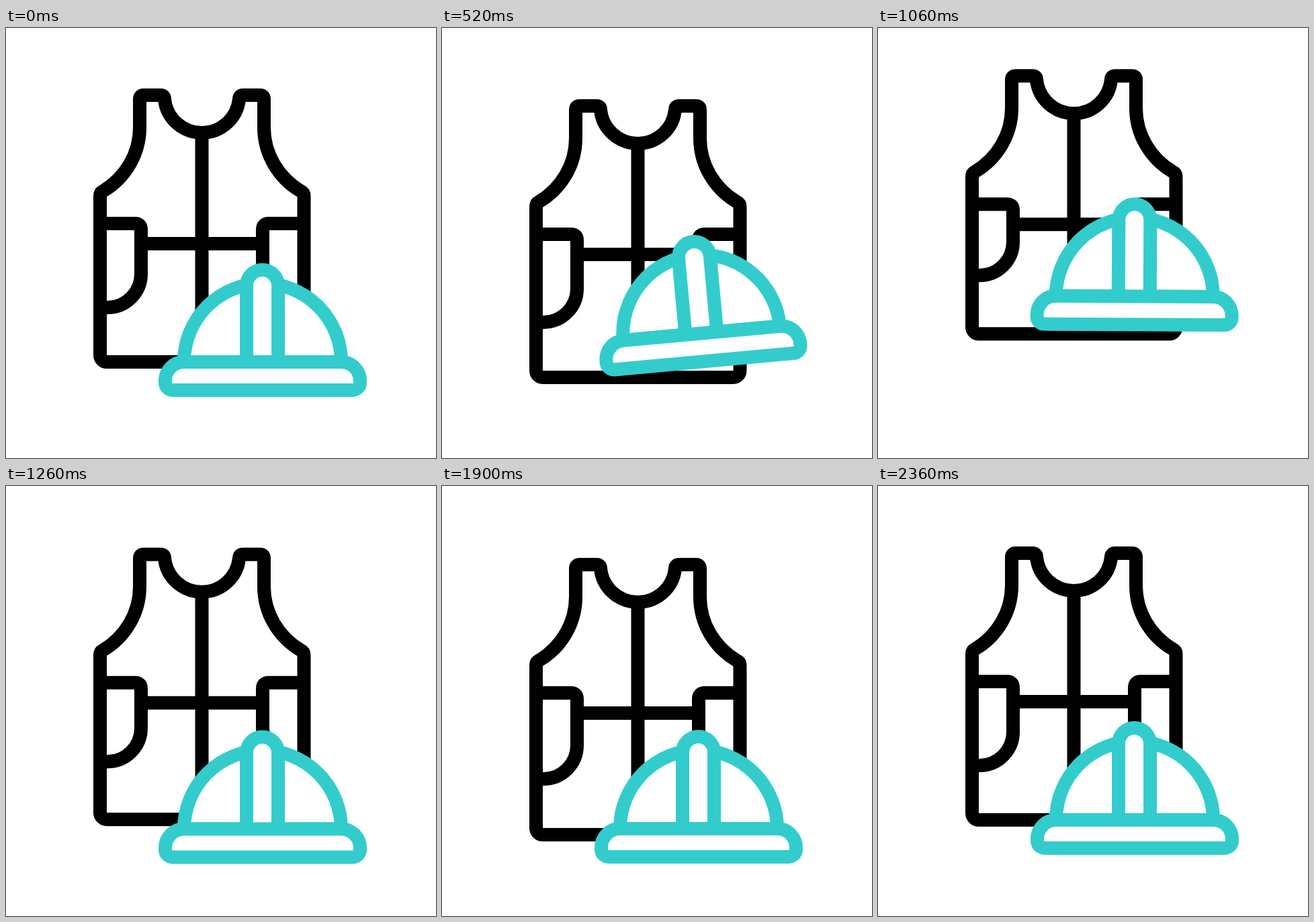
Animation, 640 px wide and 640 px high, one loop 2.56 s. Source, as an HTML page:

```html
<!DOCTYPE html>
<html lang="en">
<head>
<meta charset="utf-8">
<title>Workwear</title>
<style>
html, body { margin: 0; height: 100%; overflow: hidden; background: #fff; }
svg { display: block; width: 100%; height: 100%; stroke-width: 20; stroke-linejoin: round; }
#vest { fill: none; stroke: #000; }
#helmet { fill: #fff; stroke: #3cc; }
.trim { fill: none; stroke: #3cc; stroke-linecap: round; }
#zip { stroke-width: 22; }
</style>
</head>
<body>
<svg viewBox="0 0 640 640">
  <path id="vest"/>
  <path id="zip" class="trim"/>
  <g id="helmet">
    <path d="M265 497A117 117 0 0 1 499 497Z"/>
    <path d="M358 497V383.5A23.5 23.5 0 0 1 405 383.5V497"/>
    <path d="M265 497H499A28 28 0 0 1 527 525V528A11 11 0 0 1 516 539H248A11 11 0 0 1 237 528V525A28 28 0 0 1 265 497Z"/>
  </g>
  <path id="sparkA" class="trim"/>
  <path id="sparkB" class="trim"/>
</svg>
<script>
const LOOP = 2560;
const $ = id => document.getElementById(id);

// Smooth curve through keys; flat at every extreme, so nothing overshoots.
function track(times, values) {
  const secant = i => (values[i + 1] - values[i]) / (times[i + 1] - times[i]);
  const slopes = times.map((_, i) => {
    if (i === 0 || i === times.length - 1) return 0;
    const a = secant(i - 1), b = secant(i);
    return a * b <= 0 ? 0 : 2 * a * b / (a + b);
  });
  return t => {
    const last = times.length - 1;
    if (t <= times[0]) return values[0];
    if (t >= times[last]) return values[last];
    const i = times.findIndex(k => k > t) - 1;
    const h = times[i + 1] - times[i], u = (t - times[i]) / h, w = 1 - u;
    return values[i] * w * w * (1 + 2 * u) + values[i + 1] * u * u * (3 - 2 * u)
      + h * u * w * (slopes[i] * w - slopes[i + 1] * u);
  };
}

const vestTimes = [220, 410, 520, 740, 780, 920, 1260, 1360, 1530, 1580, 1900, 2360];
const topShift = track(vestTimes, [0, 22, 16, -27, -30, -39, 1.5, 20, -21, -15, 17, 0]);
const hemShift = track(vestTimes, [0, 30, 23, -36, -42, -55, -1, 26, -32, -28, 22, 0]);
const pocketShift = track(vestTimes, [0, 28, 22, -44, -50, -61, -6, 24, -25, -20, 20, 0]);
const helmetShift = track(
  [220, 360, 520, 780, 900, 1260, 1280, 1310, 1560, 1580, 1900, 2360],
  [0, 26, -42, -126, -146, 13, 23, 26, -21, -20.5, 13, 0]);
const helmetTurn = track([330, 520, 580, 780, 880, 1100], [0, -5.2, -7, 1.8, 3.5, 0]);

const progress = (t, from, to) => Math.min(1, Math.max(0, (t - from) / (to - from)));

// Visible part of a stroke that draws itself on, then off.
function trim(id, t, x0, y0, x1, y1) {
  const tip = 1 - (1 - progress(t, 680, 820)) ** 2;
  const tail = (1 - Math.cos(Math.PI * progress(t, 710, 900))) / 2;
  const at = k => `${x0 + (x1 - x0) * k} ${y0 + (y1 - y0) * k}`;
  $(id).setAttribute("d", tip > tail ? `M${at(tail)}L${at(tip)}` : "");
}

function vestPath(top, hem, pocket) {
  const y = v => v + top, b = v => v + hem, p = v => v + pocket;
  return `M140 ${y(250)}V${b(487)}A10 10 0 0 0 150 ${b(497)}H433.5A10 10 0 0 0 443.5 ${b(487)}V${y(250)}`
    + `Q443.5 ${y(245)} 439 ${y(243)}C405 ${y(223)} 384 ${y(187)} 384 ${y(148)}V${y(106)}`
    + `Q384 ${y(100)} 378 ${y(100)}H353Q347 ${y(100)} 347 ${y(106)}`
    + `A55.8 55.8 0 0 1 236 ${y(106)}Q236 ${y(100)} 230 ${y(100)}H205`
    + `Q199 ${y(100)} 199 ${y(106)}V${y(148)}C199 ${y(187)} 178 ${y(223)} 144 ${y(243)}Q140 ${y(245)} 140 ${y(250)}Z`
    + `M140 ${y(291)}H192Q201 ${y(291)} 201 ${y(300)}V${p(366)}A50 50 0 0 1 151 ${p(416)}H145`
    + `M443 ${y(291)}H391Q382 ${y(291)} 382 ${y(300)}V${p(366)}A50 50 0 0 0 432 ${p(416)}H438`
    + `M201 ${y(321)}H382M291.5 ${y(156)}V${b(497)}`;
}

function draw(t) {
  const top = topShift(t), hem = hemShift(t);
  $("vest").setAttribute("d", vestPath(top, hem, pocketShift(t)));
  $("helmet").setAttribute("transform",
    `translate(0 ${helmetShift(t)}) rotate(${helmetTurn(t)} 381.5 449.5)`);
  trim("zip", t + 12, 291.5, 497 + hem, 291.5, 156 + top);
  trim("sparkA", t, 479, 254, 510, 206);
  trim("sparkB", t, 500, 287, 555, 267);
}

const start = performance.now();
function tick() {
  draw((performance.now() - start) % LOOP);
  requestAnimationFrame(tick);
}
tick();
</script>
</body>
</html>
```
